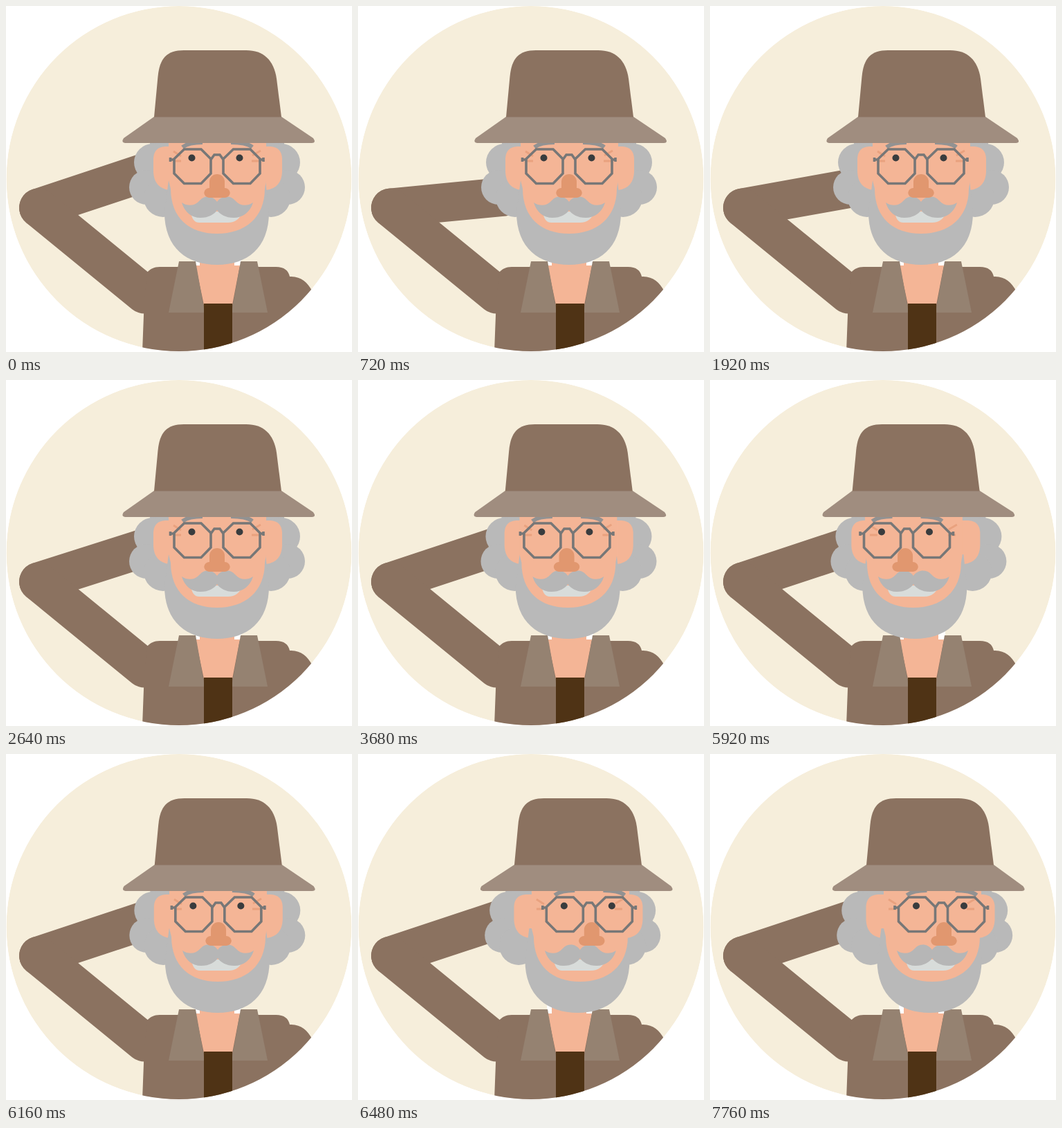
Write an HTML page that moves like this. It is 500 by 500 pixels and loops after 8000 ms.

```html
<!DOCTYPE html>
<html lang="en">
<head>
<meta charset="utf-8">
<title>Scratching his head</title>
<style>
html, body { margin: 0; width: 100%; height: 100%; overflow: hidden; background: #fff; }
svg { display: block; width: 100vw; height: 100vh; }
</style>
</head>
<body>
<svg viewBox="0 0 500 500">
  <defs>
    <clipPath id="disc"><circle cx="250" cy="249.500" r="249.500"/></clipPath>
    <g id="curls" fill="#b9b9b9">
      <circle cx="212" cy="226" r="27"/>
      <circle cx="203" cy="262" r="25"/>
      <circle cx="227" cy="277" r="28"/>
    </g>
    <path id="ear" fill="#f4b596" d="M245 203H230Q214 204 213 220V240Q214 263 236 266H245Z"/>
    <path id="collar" fill="#958271" d="M250 369H274L287 443H235Z"/>
    <path id="lens" d="M243 221L257.500 207H282L296 221V242L282 256.500H257.500L243 242Z"/>
  </defs>
  <g clip-path="url(#disc)">
    <circle cx="250" cy="249.500" r="249.500" fill="#f6eedb"/>
    <g fill="none" stroke="#8b7260" stroke-width="56" stroke-linecap="round">
      <path id="forearm" d="M47 291.5H212"/>
      <path d="M47 291.5L200 416.5"/>
    </g>
    <path fill="#8b7260" d="M197 500L200 420L204 385C208 380 214 377 222 377H390C402 377 408 382 410 391C426 390 436 400 442 411L500 500H197Z"/>
    <path fill="#fff" d="M273 360H340V376H273Z"/>
    <path fill="#f4b596" d="M280 350H330V375H338L327 432H286L274 375H280Z"/>
    <use href="#collar"/>
    <use href="#collar" transform="matrix(-1 0 0 1 613 0)"/>
    <path fill="#4f3315" d="M286 430H327V500H286Z"/>

    <g data-shift="5.2">
      <path fill="#b9b9b9" d="M208 190H402V290H208Z"/>
      <use href="#curls"/>
      <use href="#curls" transform="matrix(-1 0 0 1 610 0)"/>
    </g>
    <g data-shift="12.5">
      <use href="#ear"/>
      <use href="#ear" transform="matrix(-1 0 0 1 612 0)"/>
      <path fill="#b9b9b9" d="M235 252L229 298C229 350 262 374 305 374C348 374 380 350 380 298L375 252Z"/>
    </g>
    <g data-shift="16">
      <path fill="#f4b596" d="M235 192H376V252L374 264C374 306 345 329 305 329C265 329 238 306 238 264L235 252Z"/>
      <path fill="none" stroke="#e9a27f" stroke-width="3" d="M242 210L253 217M242 224H253M356 216L368 209M355 224H366"/>
      <path fill="#d8dcda" d="M267 297H342Q336 313 321 313H279Q269 313 267 297Z"/>
      <path fill="#b6b6b6" d="M305 283C299 274 287 273 280 281C273 289 263 290 254 284C258 298 268 306 281 306C293 306 301 301 305 295C309 301 317 306 329 306C342 306 353 298 357 284C348 290 338 289 331 281C324 273 311 274 305 283Z"/>
    </g>
    <g data-shift="33">
      <path fill="#e1976f" d="M294 263V254A11 11 0 0 1 316 254V263A7.500 7 0 0 1 316.500 277H293.500A7.500 7 0 0 1 294 263Z"/>
    </g>
    <g data-shift="29.5">
      <path fill="none" stroke="#929292" stroke-width="6" d="M255 204Q264 197 284 197M325 197Q347 197 356 204"/>
      <circle cx="268.500" cy="219.500" r="5" fill="#393c3e"/>
      <circle cx="337.500" cy="219.500" r="5" fill="#393c3e"/>
      <g fill="none" stroke="#777" stroke-width="3.600">
        <use href="#lens"/>
        <use href="#lens" x="71"/>
        <path d="M296 222L301 215H309L314 222M236 222H243M367 222H373M237.500 219V225M372 219V225"/>
      </g>
    </g>
    <path id="brim" fill="#a08d7f"/>
    <path data-shift="12" fill="#8b7260" d="M214 160.500L219.500 102C222 76 232 64 257 64H347C372 64 387 78 391 105L398 160.500Z"/>
  </g>
</svg>
<script>
const LOOP = 8000, STEP = 80;
const forearm = document.getElementById('forearm');
const brim = document.getElementById('brim');
const layers = [...document.querySelectorAll('[data-shift]')];

const progress = (t, a, b) => Math.min(1, Math.max(0, (t - a) / (b - a)));
const wave = p => (1 - Math.cos(Math.PI * p)) / 2;
const ease = (t, a, b) => wave(progress(t, a, b));

// six scratches, then rest
function armAngle(t) {
  return -18.3 + 13.1 * wave(12 * progress(t, 40, 2670));
}

// head turn: -0.75 is left, 1 is right
function headTurn(t) {
  return -0.75 * ease(t, 3480, 4300) + 1.75 * ease(t, 5845, 6505);
}

function draw(t) {
  const turn = headTurn(t);
  forearm.setAttribute('transform', `rotate(${armAngle(t)} 47 291.5)`);
  for (const el of layers) {
    el.setAttribute('transform', `translate(${el.dataset.shift * turn} 0)`);
  }
  const top = 12 * turn, low = 8.5 * turn;
  brim.setAttribute('d',
    `M${214 + top} 160H${398 + top}L${444 + low} 191Q${449 + low} 198 ${442 + low} 198` +
    `H${172 + low}Q${166 + low} 197 ${170 + low} 191Z`);
}

function tick(now) {
  draw(Math.floor((now % LOOP) / STEP) * STEP);
  requestAnimationFrame(tick);
}
draw(0);
requestAnimationFrame(tick);
</script>
</body>
</html>
```
